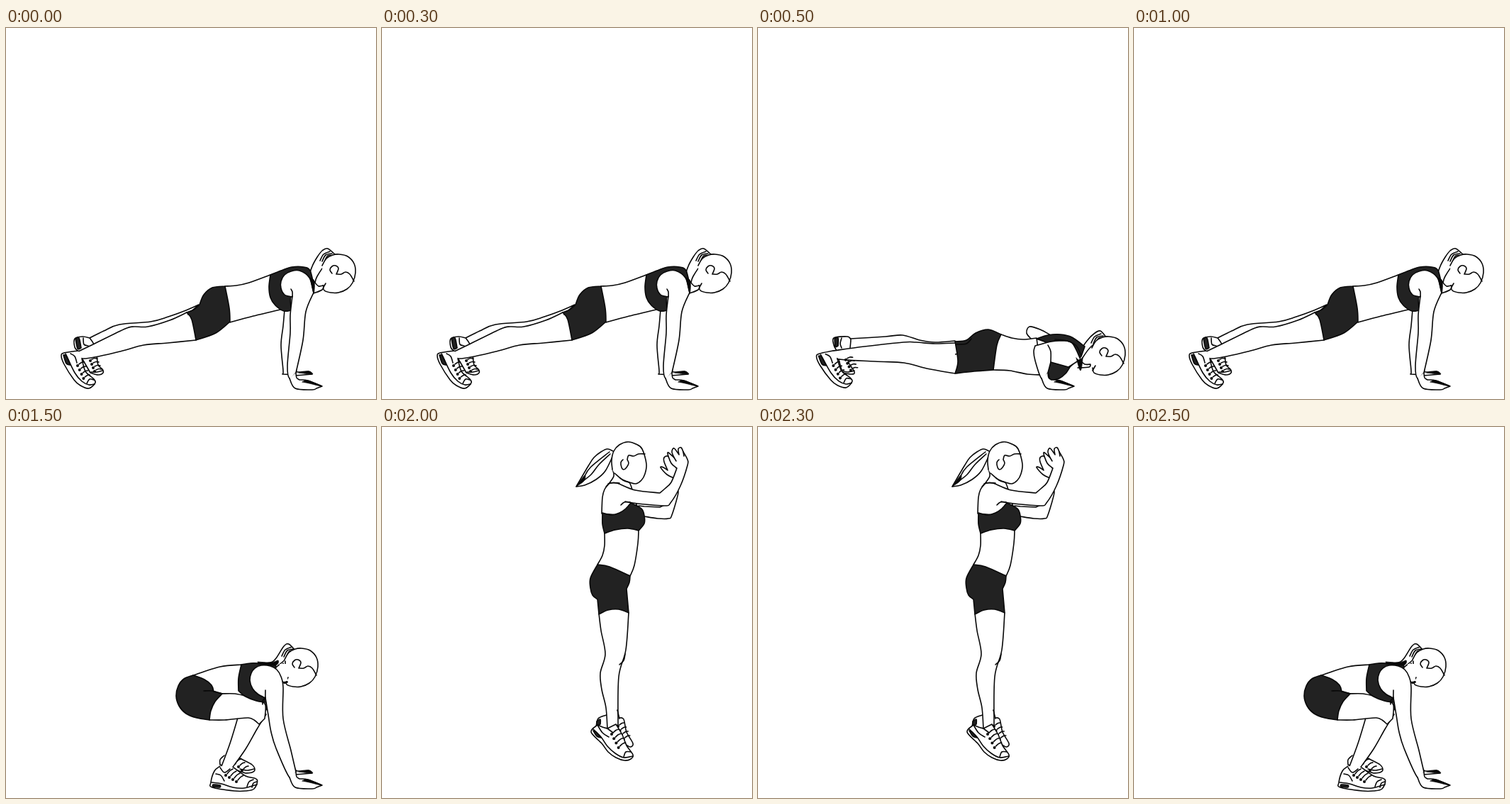
Animation, 522 px wide and 523 px high, one loop 3 s. Source, as an HTML page with a canvas:

```html
<!DOCTYPE html>
<html lang="en">
<head>
<meta charset="utf-8">
<title>Burpee</title>
<style>
html, body { margin: 0; width: 100%; height: 100%; overflow: hidden; background: #fff; }
canvas { display: block; }
</style>
</head>
<body>
<canvas id="stage" width="522" height="523"></canvas>
<script>
const ctx = document.getElementById('stage').getContext('2d');
const HOLD = 500;
const INK = '#080808';

// Catmull-Rom curve through the points; "/" marks a corner
function trace(text) {
  const path = new Path2D();
  let last = null;
  for (const part of text.split('/')) {
    const n = part.trim().split(/\s+/).map(Number);
    const pts = last ? [last] : [];
    for (let i = 0; i < n.length; i += 2) pts.push([n[i], n[i + 1]]);
    if (!last) path.moveTo(...pts[0]);
    const at = i => pts[Math.max(0, Math.min(pts.length - 1, i))];
    for (let i = 0; i < pts.length - 1; i++) {
      const [a, b, c, d] = [at(i - 1), at(i), at(i + 1), at(i + 2)];
      path.bezierCurveTo(
        b[0] + (c[0] - a[0]) / 6, b[1] + (c[1] - a[1]) / 6,
        c[0] - (d[0] - b[0]) / 6, c[1] - (d[1] - b[1]) / 6, c[0], c[1]);
    }
    last = pts[pts.length - 1];
  }
  return path;
}

function shape(text, fill, width = 1.6) {
  const path = trace(text);
  if (fill) {
    ctx.fillStyle = fill;
    ctx.fill(path);
  }
  ctx.lineWidth = width;
  ctx.stroke(path);
}
const skin = text => shape(text, '#fff');
const cloth = text => shape(text, '#222');
const solid = text => shape(text, INK, 0.8);
const line = text => shape(text);

function shifted(dx, dy, paint) {
  ctx.save();
  ctx.translate(dx, dy);
  paint();
  ctx.restore();
}

// Evenly stepped lace strokes, each with an eyelet at its start
function laces(x, y, stepX, stepY, dx, dy, count) {
  for (let i = 0; i < count; i++) {
    const px = x + i * stepX, py = y + i * stepY;
    line(`${px} ${py} ${px + dx / 2} ${py + dy / 2 - 1} ${px + dx} ${py + dy}`);
    ctx.fillStyle = INK;
    ctx.beginPath();
    ctx.arc(px - 2, py + 2, 2, 0, 7);
    ctx.fill();
  }
}

function nearHand() {
  skin('409 486 410 493 414 496 / 426 497 446 505 / 438 508 / 432 510 408 508 400 494');
  solid('418 499 426 497 445 505 428 501 418 499');
}

function farHand() {
  skin('407 481 411 485 427 484 432 488 / 408 490');
  solid('413 486 427 484 432 488 413 486');
}

function head() {
  skin('446 335 452 325 461 320 470 319 482 322 491 332 493 345 489 359 481 368 469 373 458 373 449 370 447 363');
  line('447 367 451 360');
  line('460 346 457 341 460 336 465 335 469 339 466 347 / 473 347 479 344 485 347 491 357');
}

function strands() {
  for (let i = 0; i < 3; i++) {
    const x = 443 + 3 * i, y = 328 + i;
    line(`${x} ${y} ${x + 5} ${y - 9} ${x + 14} ${y - 13 + i * 2}`);
  }
}

function pointedShoes() {
  laces(121, 467, 2, 5, 8, -1, 4);
  skin('102 455 82 458 78 462 82 474 96 496 105 504 117 508 126 500 123 494 112 484 107 466');
  line('84 459 97 486 107 498 117 503 125 502');
  line('91 459 97 463 100 472');
  cloth('81 461 85 462 91 475 / 85 473 81 461');
  laces(103, 474, 2.8, 6, 7, -3, 4);
  line('114 501 118 495 124 496');
}

function plankUp() {
  skin('118 437 138 427 160 418 204 414 229 407 254 398 272 390 / 255 405 / 130 462');
  skin('118 437 108 435 97 438 97 450 101 455 / 119 486 / 130 489 137 486 136 481 130 475 128 461 / 124 446 118 437');
  cloth('98 438 103 437 106 451 / 101 452 98 438');
  line('109 437 110 446 116 448');
  line('120 485 128 485 136 483');
  skin('393 397 391 420 388 447 391 483 390 488 / 410 489 / 404 397');
  farHand();
  skin('255 401 231 412 200 421 181 421 168 424 125 445 102 456 / 110 466 161 456 194 447 228 444 268 440');
  pointedShoes();
  skin('309 364 325 363 343 359 373 348 / 395 395 / 349 406 316 415');
  cloth('309 364 291 366 279 376 273 390 / 265 397 255 401 / 262 411 268 440 / 296 430 316 414 / 315 395 309 364');
  skin('436 359 429 348 432 336 439 323 446 314 454 311 466 321 / 451 333 439 350 436 359');
  strands();
  head();
  skin('436 359 441 364 448 363 / 446 369 434 374');
  cloth('373 348 388 342 403 337 420 337 429 342 434 362 / 433 375 / 404 375 402 398 / 392 399 380 391 373 380 371 365 373 348');
  skin('403 379 393 376 388 367 388 357 393 348 402 343 414 342 428 352 434 373 / 423 400 419 440 409 486 / 400 494 397 476 401 430 401 405 404 378');
  line('402 368 404 372 404 379');
  solid('429 352 435 357 434 374 429 352');
  nearHand();
}

function plankDown() {
  skin('130 438 180 435 204 433 228 440 250 443 278 441 / 278 460 130 460');
  skin('131 439 126 435 107 437 107 447 110 453 / 119 486 / 132 488 136 485 128 472 127 465 / 130 450 131 439');
  cloth('108 438 113 437 113 448 / 109 449 108 438');
  line('118 437 116 445 118 451');
  line('120 484 127 485 136 483');
  skin('386 439 379 430 383 421 398 425 413 433 / 403 440');
  skin('278 444 250 445 223 443 205 443 150 449 106 455 / 108 466 165 470 206 472 238 480 278 487');
  ctx.save();
  ctx.translate(106, 455);
  ctx.rotate(-0.065);
  ctx.translate(-102, -455);
  pointedShoes();
  ctx.restore();
  skin('343 432 358 437 374 439 393 437 / 400 489 / 380 488 355 483 332 482');
  cloth('278 442 294 440 307 430 325 425 343 432 / 337 447 332 482 / 305 484 278 487 / 282 470 278 442');
  line('280 446 294 445 301 438');
  skin('454 471 456 454 465 440 474 431 483 427 492 437 / 470 449 454 471');
  shifted(27, 116, strands);
  shifted(25, 116, head);
  skin('454 468 461 474 469 474 / 467 478 451 479');
  cloth('393 438 409 433 427 432 443 436 461 449 / 456 463 / 440 478 / 434 487 425 494 412 497 / 407 470 413 448 393 438');
  skin('391 448 414 442 428 441 443 444 455 467 / 438 478 / 413 471 / 409 486 / 400 494 391 469 389 456 391 448');
  line('409 447 413 456 413 471');
  line('419 439 436 441 449 448 456 462');
  solid('449 465 454 469 458 465 455 483 449 465');
  nearHand();
}

function crouch() {
  skin('308 463 302 469 302 476 / 338 488 / 347 487 351 483 347 476 334 469 326 465');
  laces(325, 472, 5, 5, 7, -4, 3);
  line('330 482 340 484 350 482');
  farHand();
  skin('327 410 316 446 303 481 / 318 482 / 338 454 354 426 367 405 / 327 410');
  skin('302 478 294 485 289 501 291 508 322 513 338 513 350 510 354 497 338 492 321 480');
  line('290 501 304 503 320 508 336 509 354 504');
  cloth('292 504 302 505 302 508 / 292 507 292 504');
  line('296 489 303 491 308 499');
  line('302 480 308 487 316 482');
  laces(312, 489, 5, 3, 8, -7, 4);
  line('340 507 343 500 349 497');
  line('347 508 349 502 354 500');
  skin('264 350 302 338 332 335 / 365 388 / 305 376 / 285 374');
  skin('304 376 323 376 341 380 357 385 366 392 365 411 / 357 419 / 350 413 342 410 327 411 / 308 413 287 413');
  cloth('264 350 251 355 243 365 240 379 244 393 254 404 269 410 287 413 / 289 400 295 387 305 376 / 293 373 / 290 364 280 356 264 350');
  line('279 372 291 372 305 376');
  skin('356 333 373 332 381 326 392 309 399 306 408 315 / 395 327 382 338 / 370 335');
  shifted(-54, -5, strands);
  shifted(-53, -7, head);
  skin('391 333 386 350 / 390 360 / 397 359 / 394 356 / 394 330');
  line('397 360 392 361 389 356');
  ctx.fillStyle = '#fff';
  ctx.fillRect(386, 334, 11, 24);
  cloth('332 335 345 333 357 333 / 380 334 / 381 339 / 366 380 365 388 / 353 386 338 380 328 372 / 328 354 332 335');
  skin('366 382 356 377 348 369 344 357 346 347 351 340 360 336 373 337 382 342 388 352 391 367 391 411 402 456 409 486 / 400 494 381 453 374 430 370 406 366 382');
  line('366 371 366 385 368 399');
  line('362 391 362 386 366 381');
  solid('355 331 374 332 384 329 380 336 355 334');
  nearHand();
}

function jump() {
  skin('362 111 370 112 / 392 113 / 405 107 / 418 91 409 124 404 129 389 129 370 126');
  skin('412 72 402 67 393 57 397 57 403 61 / 398 49 398 43 403 41 407 46 / 416 59');
  skin('317 406 305 411 302 424 / 346 449 / 351 451 354 446 345 430 341 412 335 410');
  laces(335, 420, 2.6, 6, 7, -3, 4);
  cloth('303 415 308 412 308 419 / 303 421 303 415');
  skin('306 263 309 287 315 320 308 347 310 370 316 396 318 426 / 333 420 / 334 352 344 314 348 262');
  line('343 320 341 329 335 335');
  line('332 399 335 411');
  skin('318 425 311 423 304 420 / 295 430 310 446 319 458 330 466 342 470 351 468 354 462 345 449 339 434 330 419 / 318 425');
  line('298 426 309 437 318 450 329 460 341 466 354 464');
  cloth('298 428 302 430 309 438 / 303 436 298 428');
  line('304 420 311 431 320 437');
  line('318 425 326 431');
  laces(326, 431, 3.2, 6.3, 8, -5, 4);
  line('341 465 344 458 351 458');
  skin('314 150 314 167 311 181 304 194 / 350 210 / 356 195 361 164 362 146');
  cloth('304 194 321 197 350 210 / 349 219 345 228 / 348 262 / 334 257 319 258 306 264 / 304 243 / 297 237 294 227 294 213 304 194');
  skin('325 59 327 69 320 80 314 88 311 99 310 122 / 345 125 / 360 113 / 352 85 349 78');
  cloth('311 121 323 124 335 121 344 115 351 107 / 366 115 370 125 370 136 362 146 / 347 143 329 145 314 150 / 311 137 311 121');
  skin('319 80 331 79 357 89 392 93 / 399 87 408 78 416 58 / 408 51 403 36 412 43 / 409 35 412 30 419 39 / 418 31 422 29 425 35 / 431 46 431 54 421 83 407 107 399 111 361 108 343 105');
  line('337 110 342 106 350 106');
  line('412 43 415 48');
  line('425 35 426 41');
  line('316 84 322 79 335 79');
  skin('326 34 318 31 309 35 299 43 291 55 274 84 / 286 82 302 74 315 62 326 40');
  solid('274 84 286 68 285 76 274 84');
  line('281 78 295 67 306 53 322 38');
  line('285 71 294 57 321 35');
  skin('325 60 324 47 327 34 335 25 347 21 358 24 367 31 373 52 371 66 366 75 358 80 349 78 / 340 75 328 65');
  line('349 78 341 75 336 72');
  line('340 46 337 50 338 57 341 60 345 57 348 51 346 46 / 348 40 355 41 362 38 371 38');
}

const sequence = [plankUp, plankDown, plankUp, crouch, jump, crouch];
const start = performance.now();

function show(now) {
  ctx.fillStyle = '#fff';
  ctx.fillRect(0, 0, 522, 523);
  ctx.lineJoin = ctx.lineCap = 'round';
  ctx.strokeStyle = INK;
  sequence[Math.floor(Math.max(0, now - start) / HOLD) % sequence.length]();
}

function tick(now) {
  show(now);
  requestAnimationFrame(tick);
}
show(start);
requestAnimationFrame(tick);
</script>
</body>
</html>
```
